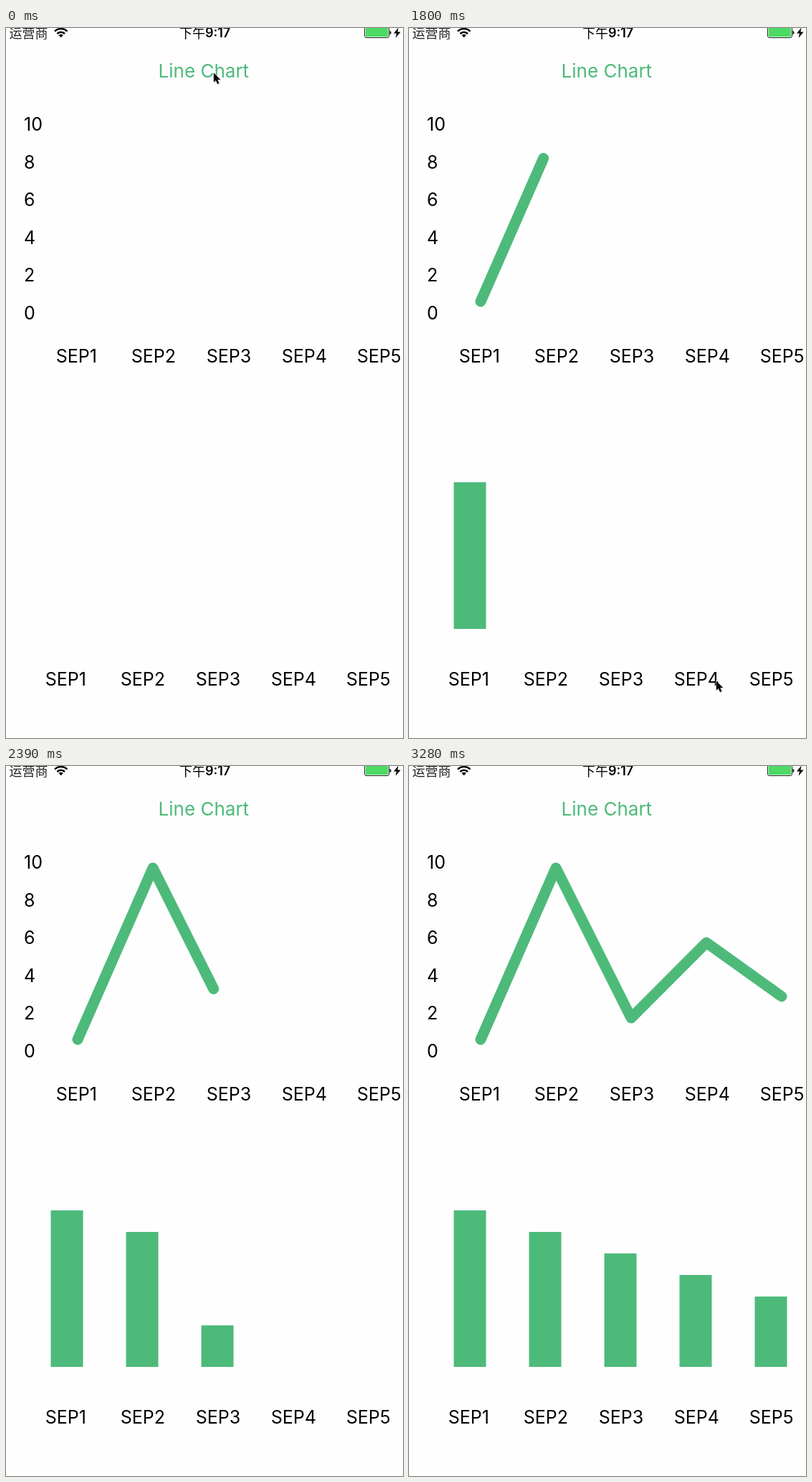
These frames come from a looping animation (554 by 989 pixels, 3.72 s). An HTML page:

```html
<!DOCTYPE html>
<html lang="zh-CN">
<head>
<meta charset="utf-8">
<title>Line Chart</title>
<style>
  html, body { margin: 0; width: 100%; height: 100%; overflow: hidden; background: #fefefe; }
  svg { display: block; width: 554px; height: 989px; }
  text { font-family: Inter, Roboto, sans-serif; font-size: 25px; fill: #000; white-space: pre; }
  .title { font-size: 26px; fill: #4dba7a; }
  .status { font-size: 18px; }
  .cjk { font-family: "Noto Sans CJK SC", "Noto Sans CJK", "Noto Sans CJK JP", sans-serif; font-size: 18px; }
</style>
</head>
<body>
<svg viewBox="0 0 554 989" xmlns="http://www.w3.org/2000/svg">
  <rect width="554" height="989" fill="#fefefe"/>

  <text class="cjk" x="4.5" y="14" style="fill:#222">运营商</text>
  <g fill="none" stroke="#000" stroke-width="2.5">
    <path d="M68 4.6 A12.3 12.3 0 0 1 85.4 4.6"/>
    <path d="M71.4 8 A7.5 7.5 0 0 1 82 8"/>
    <path d="M76.7 13.2 L73.6 10.1 A4.4 4.4 0 0 1 79.8 10.1 Z" fill="#000" stroke="none"/>
  </g>
  <text class="cjk" x="242" y="14" font-weight="500">下午</text>
  <text class="status" x="278" y="13" font-weight="600">9:17</text>
  <rect x="500.5" y="-1.5" width="34" height="15" rx="2.5" fill="#fefefe" stroke="#222"/>
  <rect x="501.8" y="-0.2" width="31.4" height="12.4" rx="1.2" fill="#4cd964"/>
  <path d="M535.5 3.8 Q537.6 4.2 537.6 6.5 T535.5 9.2 Z" fill="#111"/>
  <path d="M547.6 -0.5 L541 7.6 H545 L543.6 13.8 L550.6 5.4 H546.4 Z" fill="#000"/>

  <text class="title" x="212.6" y="69">Line Chart</text>
  <g id="labels"></g>
  <g id="bars" fill="#4dba7a"></g>
  <path id="line" fill="none" stroke="#4dba7a" stroke-width="15" stroke-linecap="round" stroke-linejoin="round"/>
  <g id="cursor">
    <path d="M1 2 V15 L4 12.4 L6 17 L8.6 16 L6.6 11.4 H10.4 Z" fill="#000" opacity=".18"/>
    <path d="M0.3 0.4 V13.6 L3.3 10.9 L5.5 16 L8 14.9 L5.8 10 H9.8 Z" fill="#000" stroke="#fff" stroke-width="1" paint-order="stroke"/>
  </g>
</svg>
<script>
const NS = "http://www.w3.org/2000/svg";
const $ = id => document.getElementById(id);

function add(parent, tag, attrs, content) {
  const el = document.createElementNS(NS, tag);
  for (const key in attrs) el.setAttribute(key, attrs[key]);
  if (content !== undefined) el.textContent = content;
  parent.appendChild(el);
  return el;
}

const LOOP = 3720, GAP = 105, BASE = 837, CAP = 45;
const points = [381, 142, 351, 246, 321].map((y, i) => [100 + GAP * i, y]);
const heights = [218, 188, 158, 128, 98];
const barTotal = heights.reduce((sum, h) => sum + h - CAP, 0);
const lengths = points.slice(1).map(([x, y], i) => Math.hypot(x - points[i][0], y - points[i][1]));
const lineTotal = lengths.reduce((a, b) => a + b);

// Held steps: start time, drawn share of both charts, pointer position
const steps = [
  [0, 0, 289.5, 62],
  [1350, 0.0515, 289.5, 62],
  [1500, 0.1345, 289.5, 62],
  [1650, 0.208, 372, 562],
  [1800, 0.282, 428.5, 909],
  [1950, 0.359, 433, 939],
  [2090, 0.4325, 460, 941],
  [2240, 0.506],
  [2390, 0.582],
  [2540, 0.6555],
  [2690, 0.7293],
  [2830, 0.804],
  [2980, 0.881],
  [3130, 0.955],
  [3280, 1]
];

for (let i = 0; i < 6; i++) {
  add($("labels"), "text", { x: 25, y: 143.3 + 52.5 * i }, 10 - 2 * i);
}
for (let i = 0; i < 5; i++) {
  add($("labels"), "text", { x: 69.7 + GAP * i, y: 466 }, "SEP" + (i + 1));
  add($("labels"), "text", { x: 54.7 + GAP * i, y: 916 }, "SEP" + (i + 1));
}
const bars = heights.map((h, i) => add($("bars"), "rect", { x: 62.5 + GAP * i, width: CAP }));

function linePath(share) {
  if (share <= 0) return "";
  let left = share * lineTotal, d = "M" + points[0];
  for (let i = 0; i < lengths.length && left > 0; i++) {
    const k = Math.min(1, left / lengths[i]);
    const [x0, y0] = points[i], [x1, y1] = points[i + 1];
    d += `L${x0 + (x1 - x0) * k},${y0 + (y1 - y0) * k}`;
    left -= lengths[i];
  }
  return d;
}

// Each bar is a thick stroke with square caps, so it appears already 45 high
function drawBars(share) {
  let left = share * barTotal;
  bars.forEach((bar, i) => {
    const span = heights[i] - CAP;
    const h = left > 1e-6 ? CAP + Math.min(left, span) : 0;
    bar.setAttribute("y", BASE - h);
    bar.setAttribute("height", h);
    left -= span;
  });
}

function draw(time) {
  const t = time % LOOP;
  const [, share, x, y] = steps.filter(s => s[0] <= t).pop();
  $("line").setAttribute("d", linePath(share));
  drawBars(share);
  $("cursor").setAttribute("visibility", x === undefined ? "hidden" : "visible");
  if (x !== undefined) $("cursor").setAttribute("transform", `translate(${x} ${y})`);
}

const start = performance.now();
function tick() {
  draw(performance.now() - start);
  requestAnimationFrame(tick);
}
tick();
</script>
</body>
</html>
```
